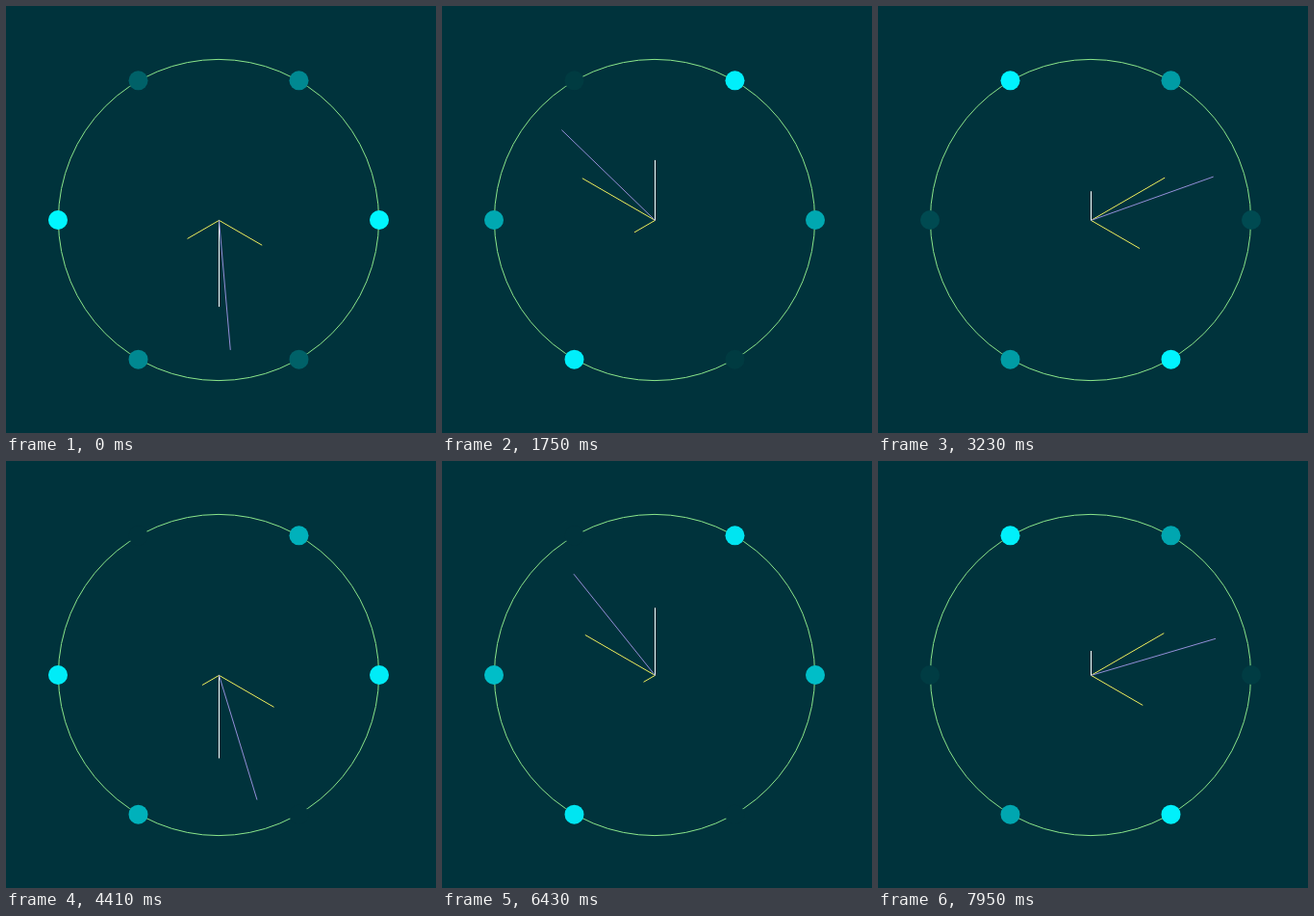
Write an HTML page that moves like this. It is 447 by 443 pixels and loops after 7.99 s.

```html
<!DOCTYPE html>
<html lang="en">
<head>
<meta charset="utf-8">
<title>Rotating field</title>
<style>
  html, body { margin: 0; width: 100%; height: 100%; overflow: hidden; background: #00333c; }
  svg { display: block; width: 447px; height: 443px; }
  line { stroke-width: 1; }
</style>
</head>
<body>
<svg id="stage" viewBox="0 0 447 443">
  <circle cx="221" cy="222" r="166.6" fill="none" stroke="#8be68b"/>
</svg>
<script>
const LOOP = 7990;
const STEP = 40;
const AMPLITUDE = 90;
const ORIGIN = { x: 221.5, y: 222.4 };
const stage = document.getElementById('stage');
const rad = degrees => degrees * Math.PI / 180;

// [ms, field angle in degrees, clockwise from the right]
const sweep = [
  [0, 85], [1750, 224], [3230, 340.4], [4410, 433],
  [5430, 513.4], [6430, 591.2], [7950, 703.6]
];

function add(tag, attributes) {
  const node = document.createElementNS('http://www.w3.org/2000/svg', tag);
  for (const name in attributes) node.setAttribute(name, attributes[name]);
  return stage.appendChild(node);
}

function addLine(stroke) {
  return add('line', { x1: ORIGIN.x, y1: ORIGIN.y, stroke });
}

function addDot(degrees) {
  return add('circle', {
    cx: 221 + 167 * Math.cos(rad(degrees)),
    cy: 222 + 167 * Math.sin(rad(degrees)),
    r: 10
  });
}

function point(line, length, angle) {
  line.setAttribute('x2', ORIGIN.x + length * Math.cos(angle));
  line.setAttribute('y2', ORIGIN.y + length * Math.sin(angle));
}

// Each coil lies across its own axis.
const phases = [[30, '#eeee5c'], [150, '#eeee5c'], [90, '#ffffff']].map(([axis, color]) => ({
  axis: rad(axis),
  dots: [addDot(axis - 90), addDot(axis + 90)],
  line: addLine(color)
}));
const field = addLine('#938fd8');

function fieldAngle(time) {
  let i = 1;
  while (i < sweep.length - 1 && time >= sweep[i][0]) i++;
  const [t0, a0] = sweep[i - 1];
  const [t1, a1] = sweep[i];
  const held = Math.min(t1, t0 + Math.floor((time - t0) / STEP) * STEP);
  return rad(a0 + (a1 - a0) * (held - t0) / (t1 - t0));
}

function coilColor(level) {
  const green = Math.round(Math.max(51, 260 * level - 13));
  const blue = Math.round(Math.min(255, Math.max(60, 268 * level - 9)));
  return `rgb(0,${green},${blue})`;
}

function draw(time) {
  const angle = fieldAngle(time);
  for (const { axis, dots, line } of phases) {
    const current = Math.cos(angle - axis);
    point(line, AMPLITUDE * current, axis);
    for (const dot of dots) dot.setAttribute('fill', coilColor(Math.abs(current)));
  }
  point(field, AMPLITUDE * 1.5, angle);
}

const start = performance.now();
function tick() {
  draw((performance.now() - start) % LOOP);
  requestAnimationFrame(tick);
}
tick();
</script>
</body>
</html>
```
